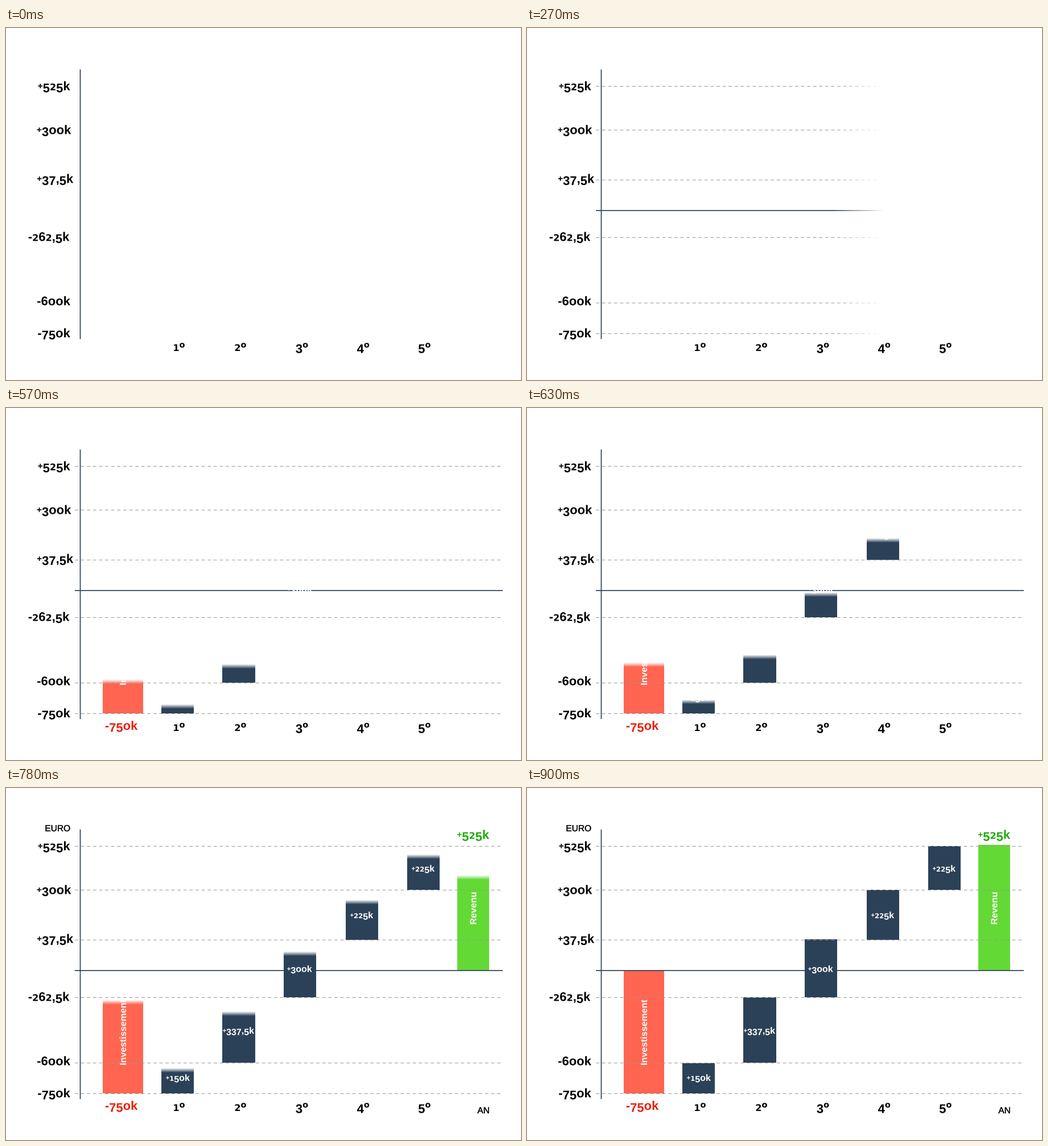
A matplotlib script that plays this animation: 905x619 px, repeating every 930 ms.

```python
import numpy as np
import matplotlib.pyplot as plt
from matplotlib.animation import FuncAnimation
from matplotlib.colors import to_rgb
from matplotlib.patches import PathPatch
from matplotlib.path import Path
from matplotlib.textpath import TextPath
from matplotlib.transforms import Affine2D

W, H, DPI = 905, 619, 100
FRAMES, INTERVAL = 31, 30
PX = 72 / DPI
NAVY, RED, GREEN = "#2b4157", "#ff6550", "#63d936"
SANS, WIDE = "Liberation Sans", "DejaVu Sans"

GRID_END = 15            # grid wipe ends and bars start to grow here
LEFT, RIGHT = 121, 873
WIPE_SOFT, BAR_SOFT = 90, 8

# Old-style figures: glyph, font, scale, baseline shift in em
OLD_STYLE = {"0": ("o", SANS, 1, 0), "1": ("1", WIDE, 0.73, 0),
             "2": ("2", WIDE, 0.73, 0), "+": ("+", SANS, 0.7, 0.11),
             "º": ("o", WIDE, 0.66, 0.28)}
OLD_STYLE.update({d: (d, SANS, 1, -0.16) for d in "34579"})

fig = plt.figure(figsize=(W / DPI, H / DPI), dpi=DPI, facecolor="white")
ax = fig.add_axes([0, 0, 1, 1])
ax.axis("off")


def glyph_path(s, font, size, weight):
    return TextPath((0, 0), s, size=size, prop=dict(family=font, weight=weight))


def advance(ch, *style):
    both = glyph_path(ch + "|", *style).vertices[:, 0].max()
    return both - glyph_path("|", *style).vertices[:, 0].max()


def label(s, x, y, size=22, color="black", weight="bold", angle=0, stroke=0):
    """Text centred on x with its baseline at y; turned text is centred on y."""
    parts, pen = [], 0
    for ch in s:
        glyph, font, scale, shift = OLD_STYLE.get(ch, (ch, SANS, 1, 0))
        style = font, size * scale, weight
        move = Affine2D().translate(pen, shift * size)
        parts.append(move.transform_path(glyph_path(glyph, *style)))
        pen += advance(glyph, *style)
    path = Path.make_compound_path(*parts)
    box = path.get_extents()
    place = (Affine2D().translate(-(box.x0 + box.x1) / 2, 0)
             .scale(1, -1).rotate_deg(-angle).translate(x, y))
    patch = PathPatch(place.transform_path(path), facecolor=color,
                      edgecolor=color, lw=stroke * PX, zorder=6)
    return ax.add_patch(patch)


def line(xs, ys, color, width, z, **kw):
    ax.plot(xs, ys, color=color, lw=width * PX, zorder=z, snap=False,
            solid_capstyle="butt", dash_capstyle="butt", **kw)


def tint(color, alpha):
    rgba = np.empty(alpha.shape + (4,))
    rgba[..., :3] = to_rgb(color)
    rgba[..., 3] = np.clip(alpha, 0, 1)
    return rgba


class Bar:
    def __init__(self, x0, x1, top, base, color, start):
        self.height, self.color, self.start = base - top, color, start
        self.level = self.height - np.arange(self.height) - 0.5
        self.image = ax.imshow(tint(color, np.zeros((self.height, 1))),
                               extent=(x0, x1, base, top), aspect="auto",
                               interpolation="nearest", zorder=2)

    def draw(self, frame):
        grown = (frame - GRID_END) / (FRAMES - 1 - GRID_END)
        lead = (self.height + BAR_SOFT) * grown
        alpha = (lead - self.level) / BAR_SOFT
        self.image.set_data(tint(self.color, alpha[:, None]))
        self.image.set_visible(frame >= self.start)


# Grid and axes
for y in (102.5, 179.5, 267.3, 368.5, 483.6, 537.5):
    line([LEFT, 870], [y, y], "#999999", 1, 3, dashes=(6, 4.6))
line([LEFT, RIGHT], [321, 321], NAVY, 1.7, 2.5)
line([130.5, 130.5], [73, 547], NAVY, 1.7, 5)

cover_x = np.arange(118, 878) + 0.5
cover = ax.imshow(tint("white", np.ones((1, cover_x.size))),
                  extent=(118, 878, 545, 95), aspect="auto",
                  interpolation="nearest", zorder=4)

# Fixed labels
for s, x, y in (("+525k", 84.5, 109.5), ("+300k", 84.5, 186.5), ("+37,5k", 86.5, 272.5),
                ("-262,5k", 75.5, 374.5), ("-600k", 84, 487.5), ("-750k", 84.5, 544)):
    label(s, x, y)
for i in range(5):
    label(f"{i + 1}º", 304.5 + 107.7 * i, 568)

bars = [Bar(170, 240, 321, 537, RED, 16),
        Bar(273, 330, 484, 537, NAVY, 18),
        Bar(380, 437, 368, 483, NAVY, 19),
        Bar(488, 545, 266, 368, NAVY, 20),
        Bar(597, 654, 179, 267, NAVY, 21),
        Bar(705, 762, 102, 179, NAVY, 22),
        Bar(793, 849, 100, 321, GREEN, 23)]

# Labels that pop in, with their first frame
timed = [(label("-750k", 203, 566, color="#e8200d"), 16),
         (label("+525k", 821, 89.5, color="#1faa0b"), 23),
         (label("AN", 838.5, 572, 15.5, weight="normal", stroke=0.5), 23),
         (label("EURO", 91, 76, 15.5, weight="normal", stroke=0.5), 25),
         (label("Investissement", 211, 429.5, 16, "white", angle=90), 19),
         (label("Revenu", 826.5, 211.5, 16, "white", angle=90), 19)]
for s, x, y in (("+150k", 302, 515), ("+337,5k", 408.5, 432), ("+300k", 516, 323.5),
                ("+225k", 625, 229), ("+225k", 733, 147)):
    timed.append((label(s, x, y, 16, "white"), 19))

ax.set_xlim(0, W)
ax.set_ylim(H, 0)


def draw(frame):
    lead = LEFT + (RIGHT - LEFT + WIPE_SOFT) * frame / GRID_END
    alpha = (cover_x - lead + WIPE_SOFT) / WIPE_SOFT
    cover.set_data(tint("white", alpha[None, :]))
    cover.set_visible(frame < GRID_END)
    for bar in bars:
        bar.draw(frame)
    for artist, start in timed:
        artist.set_visible(frame >= start)
    return []


anim = FuncAnimation(fig, draw, frames=FRAMES, interval=INTERVAL,
                     repeat=True, repeat_delay=0, blit=False)
plt.show()
```
